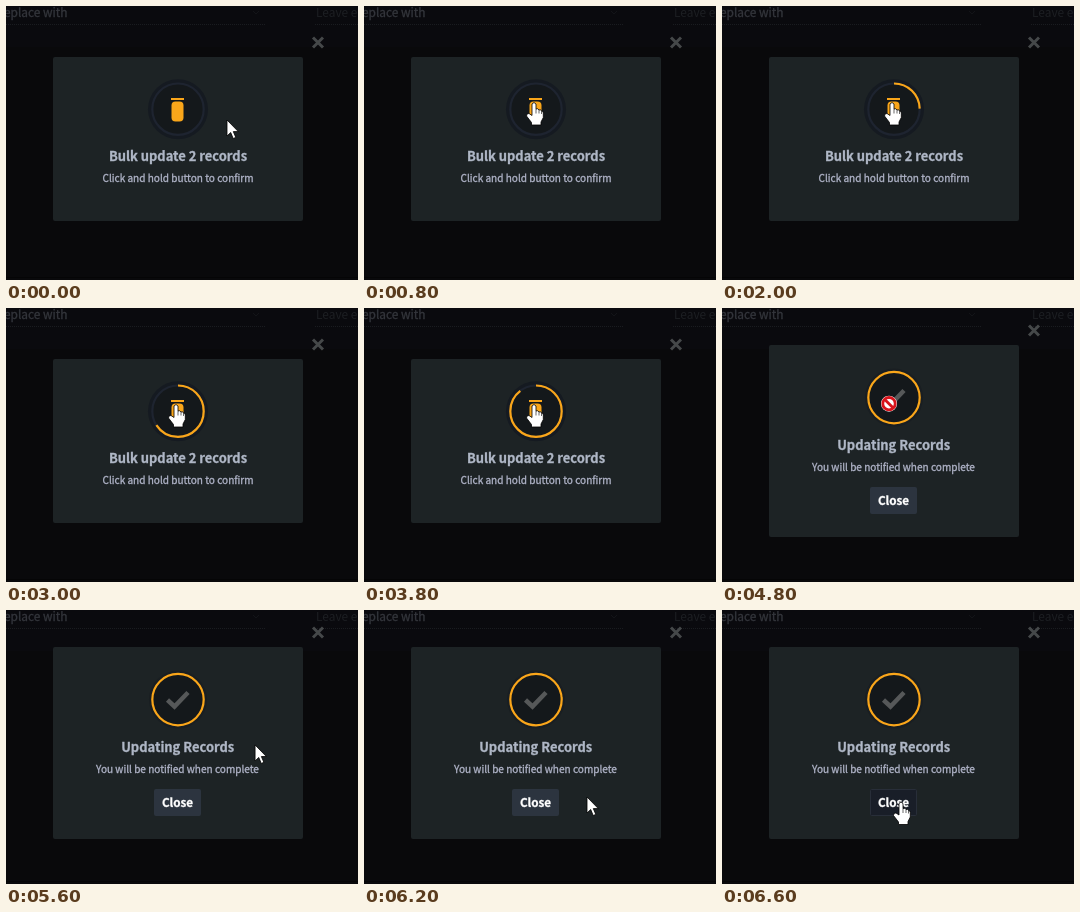
Recreate the animation shown at these times as an HTML page. Size 352 by 274 pixels, loop 7.4 s.

```html
<!DOCTYPE html>
<html lang="en">
<head>
<meta charset="utf-8">
<title>Hold to confirm</title>
<style>
  html, body { margin: 0; width: 100%; height: 100%; overflow: hidden; background: #09090b; }
  svg { display: block; width: 100vw; height: 100vh; }
  text { font-family: "Noto Sans CJK JP", "Noto Sans CJK SC", "Noto Sans CJK", "Noto Sans", sans-serif; stroke-width: .3; }
  .title { font-size: 12.95px; font-weight: 700; fill: #afb7c6; stroke: #afb7c6; text-anchor: middle; }
  .note { font-size: 10.05px; fill: #b0b4c8; stroke: #b0b4c8; text-anchor: middle; }
  .label { font-size: 11.7px; font-weight: 700; fill: #fff; stroke: #fff; text-anchor: middle; }
  .page { font-size: 11.9px; fill: #34363c; stroke: #34363c; }
  .panel { fill: #1d2325; }
  .gold { fill: none; stroke: #faa61a; stroke-width: 2.2; }
  .cursor { fill: #fff; stroke: #000; stroke-width: .8; stroke-linejoin: round; }
</style>
</head>
<body>
<svg viewBox="0 0 352 274">
  <rect width="352" height="274" fill="#09090b"/>
  <rect width="352" height="41" fill="#0a0a0e"/>
  <path d="M0 271.5H352" stroke="#050506"/>
  <text class="page" x="-2" y="11">eplace with</text>
  <text class="page" x="310" y="11" style="fill:#1d1f23;stroke:none">Leave empty</text>
  <path d="M0 18.5H259M309 18.5H352" stroke="#1a1c20" stroke-dasharray="1 1"/>
  <path d="M247 5l3 3 3-3" fill="none" stroke="#131418"/>
  <path id="dismiss" d="M-5-5L5 5M5-5L-5 5" stroke="#454849" stroke-width="3"/>

  <g id="confirm">
    <rect class="panel" x="47" y="51" width="250" height="164" rx="2"/>
    <circle cx="172" cy="103.2" r="30" fill="#151a21"/>
    <circle cx="172" cy="103.2" r="25.7" fill="#14181b" stroke="#1e2430" stroke-width="2.2"/>
    <path d="M165 93H178" stroke="#faa61a" stroke-width="2"/>
    <rect x="165.5" y="95.5" width="12" height="20" rx="4" fill="#faa61a"/>
    <circle id="progress" class="gold" cx="172" cy="103.2" r="25.7" pathLength="1" transform="rotate(-90 172 103.2)"/>
    <text class="title" x="172" y="155">Bulk update 2 records</text>
    <text class="note" x="172" y="176">Click and hold button to confirm</text>
  </g>

  <g id="done">
    <rect class="panel" x="47" y="37" width="250" height="192" rx="2"/>
    <circle cx="172" cy="89.6" r="29" fill="#191e22"/>
    <circle class="gold" cx="172" cy="89.6" r="25.7" style="fill:#14181b"/>
    <path d="M161.5 90L168.5 96.5L182 82.5" fill="none" stroke="#565859" stroke-width="4.5"/>
    <text class="title" x="171.7" y="142">Updating Records</text>
    <text class="note" x="171.5" y="163">You will be notified when complete</text>
    <rect id="button" x="148.5" y="179.5" width="46" height="26" rx="1"/>
    <text class="label" x="171.5" y="197">Close</text>
  </g>

  <path id="arrow" class="cursor" d="M0 0V16L3.7 12.5L6.2 18.5L8.8 17.4L6.3 11.6H11.3Z"/>
  <g id="hand" class="cursor">
    <path d="M-2 1.5Q0-1.5 2 1.5V6.5Q4 5.5 5 7.5Q7 6.5 7.5 8.5Q9.3 8.5 9.3 10.5V15L7 19.5V22.5H-2.5V20L-7.5 13.5Q-7.5 10.5-5 11L-2 13Z"/>
    <path d="M2 6.5V11M5 7.5V11M7.5 8.5V11.5" stroke-width=".6"/>
  </g>
  <g id="blocked">
    <circle r="8" fill="#fff"/>
    <circle r="6.2" fill="#fff" stroke="#d8141c" stroke-width="2.8"/>
    <path d="M-4.5-4.5L4.5 4.5" stroke="#d8141c" stroke-width="2.8"/>
  </g>
</svg>
<script>
const LOOP = 7400, STEP = 200;
const el = id => document.getElementById(id);
const show = (id, on) => el(id).style.display = on ? "" : "none";
const move = (id, x, y) => el(id).setAttribute("transform", `translate(${x} ${y})`);
const clamp = v => Math.min(1, Math.max(0, v));

// Point on a Bezier curve of any degree
function bezier(points, u) {
  while (points.length > 1)
    points = points.slice(1).map((p, i) => p.map((v, k) => points[i][k] * (1 - u) + v * u));
  return points[0];
}

function pointer(t) {
  if (t < 4800) {
    const spot = bezier([[221, 114], [212, 161], [170, 96.5]], clamp(t / 800));
    return [t < 600 ? "arrow" : "hand", ...spot];
  }
  if (t < 5400) return ["blocked", 167, 95.7];
  if (t < 6400) {
    const spot = bezier([[167, 96], [230, 100], [345, 205], [223, 187]], (t - 5200) / 1000);
    return ["arrow", ...spot];
  }
  return t < 6600 ? ["hand", 167, 189] : ["hand", 179, 192];
}

function draw(t) {
  const done = t >= 4800;
  show("confirm", !done);
  show("done", done);
  move("dismiss", 312, done ? 22.5 : 36.5);

  const held = t < 4600 ? 1 - (1 - clamp((t - 1500) / 3000)) ** 1.55 : 0;
  show("progress", held > 0);
  el("progress").setAttribute("stroke-dasharray", `${held} 2`);

  const hover = t >= 6400;
  el("button").setAttribute("fill", hover ? "#191e28" : "#2c343f");
  el("button").setAttribute("stroke", hover ? "#282e39" : "#2c343f");

  const [kind, x, y] = pointer(t);
  for (const id of ["arrow", "hand", "blocked"]) show(id, id === kind);
  move(kind, x, y);
}

// The screen refreshes five times a second
function tick() {
  draw(Math.floor(performance.now() % LOOP / STEP) * STEP);
  requestAnimationFrame(tick);
}
tick();
</script>
</body>
</html>
```
